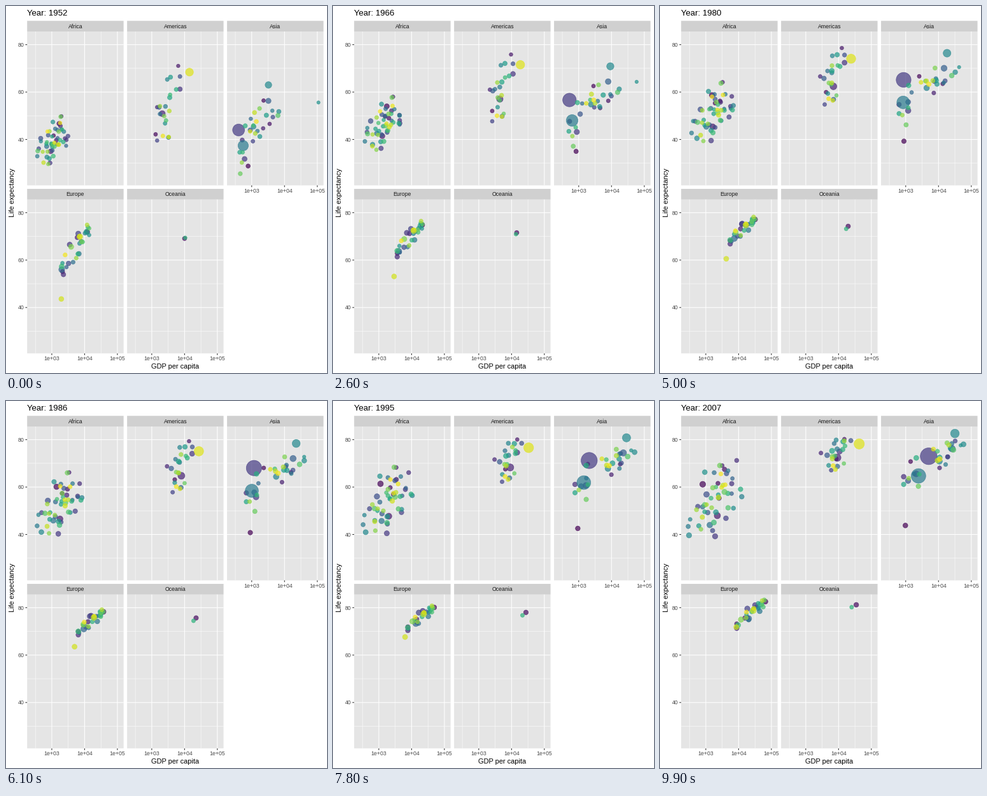
A matplotlib script for the animation above (10000 ms loop, 504 px wide and 576 px high).

```python
import numpy as np
import matplotlib
import matplotlib.pyplot as plt
from matplotlib.animation import FuncAnimation
from matplotlib.patches import Rectangle

W, H, FRAMES = 504, 576, 100
LEFT, RIGHT, GAP, STRIP_H = 33.2, 498.5, 5.5, 16.7
PANEL_W = (RIGHT - LEFT - 2 * GAP) / 3
PANEL_H = 241.5
X_MIN, X_MAX = 2.248, 5.189      # log10 of GDP per capita
Y_MIN, Y_MAX = 20.65, 85.55      # life expectancy
MAX_POP = 1318.7                 # millions
DRIFT = 0.8                      # how far dots change rank over the loop
TICK, AXIS_TEXT = "#333333", "#4d4d4d"

plt.rcParams["font.family"] = "Liberation Sans"
rng = np.random.default_rng(11)

# name: column, row, population growth
PANELS = {
    "Africa": (0, 0, 3.6),
    "Americas": (1, 0, 2.3),
    "Asia": (2, 0, 2.5),
    "Europe": (0, 1, 1.2),
    "Oceania": (1, 1, 2.2),
}

# Crowds: count, median population, correlation, then
# (mean x, sd x, mean y, sd y) at the start, middle and end
CROWDS = {
    "Africa": (52, 3, .5, (3.07, .27, 39.5, 5), (3.25, .36, 51, 6.5),
               (3.28, .43, 54.5, 9.3)),
    "Americas": (23, 4, .6, (3.48, .2, 53, 8.5), (3.8, .2, 65.5, 6.3),
                 (3.9, .25, 73.5, 4)),
    "Asia": (28, 7, .7, (3.2, .33, 46.5, 8.3), (3.65, .45, 62.5, 7),
             (3.85, .48, 71.5, 6)),
    "Europe": (29, 8, .85, (3.72, .22, 65, 4.6), (4.12, .2, 73, 2.4),
               (4.38, .23, 78, 2.7)),
}

# Landmarks: panel, shade, population, x and y at the start, middle and end
LANDMARKS = [
    ("Asia", 0, 8.4, (2.89, 2.945, 2.99), (28.8, 39.2, 43.8)),
    ("Asia", .17, 556, (2.6, 2.93, 3.7), (44, 65, 73)),
    ("Asia", .41, 372, (2.74, 2.92, 3.39), (37.4, 55.5, 64.7)),
    ("Asia", .47, 86, (3.51, 4.255, 4.5), (63, 76.3, 82.6)),
    ("Asia", .5, .2, (5.035, 4.63, 4.675), (55.6, 70.4, 77.6)),
    ("Americas", .1, 57, (3.32, 3.84, 3.96), (50.9, 62.3, 72.4)),
    ("Americas", .95, 157, (4.15, 4.38, 4.63), (68.4, 74, 78.2)),
    ("Europe", .93, 22, (3.29, 3.62, 3.93), (43.6, 60.4, 71.8)),
    ("Oceania", .035, 8.7, (4, 4.29, 4.54), (69.1, 74.2, 81.2)),
    ("Oceania", .645, 2, (4.02, 4.23, 4.4), (69.4, 73.1, 80.2)),
]


def bend(t, start, mid, end):
    """Quadratic that passes through three values at t = 0, 0.5 and 1."""
    start, mid, end = map(np.asarray, (start, mid, end))
    return start + (end - start) * t + (4 * mid - 2 * (start + end)) * t * (1 - t)


def origin(panel):
    col, row, _ = PANELS[panel]
    return LEFT + col * (PANEL_W + GAP), 40 + row * (PANEL_H + STRIP_H + GAP)


def to_px(panel, gx, gy):
    left, top = origin(panel)
    return (left + (gx - X_MIN) / (X_MAX - X_MIN) * PANEL_W,
            top + (Y_MAX - gy) / (Y_MAX - Y_MIN) * PANEL_H)


def diameter(pop):
    size = 2 + 10 * np.sqrt(np.minimum(pop / MAX_POP, 1))
    return .75 * (size * 2.845 + .94)


class Group:
    """Dots of one panel: shades, populations and a path (x, y) over time."""

    def __init__(self, panel, shades, pops, path):
        self.panel, self.path = panel, path
        self.shades, self.pops = np.atleast_1d(shades), np.atleast_1d(pops)

    def at(self, t):
        x, y = to_px(self.panel, *self.path(t))
        growth = PANELS[self.panel][2]
        d = diameter(self.pops * (1 + (growth - 1) * t))
        return np.column_stack([np.broadcast_to(x, d.shape),
                                np.broadcast_to(y, d.shape), d])


def landmark(panel, shade, pop, xs, ys):
    return Group(panel, shade, pop, lambda t: (bend(t, *xs), bend(t, *ys)))


def crowd(panel, count, median, corr, *stats):
    a0, a1, b0, b1 = rng.normal(size=(4, count))
    shades = (rng.permutation(count) + .5) / count
    pops = median * 10 ** np.clip(rng.normal(0, .4, count), -1, .9)

    def path(t):
        turn = DRIFT * t
        a, b = (np.clip(p * np.cos(turn) + q * np.sin(turn), -1.9, 1.9)
                for p, q in ((a0, a1), (b0, b1)))
        mx, sx, my, sy = bend(t, *stats)
        return mx + sx * a, my + sy * (corr * a + np.sqrt(1 - corr**2) * b)

    return Group(panel, shades, pops, path)


groups = [crowd(name, *spec) for name, spec in CROWDS.items()]
groups += [landmark(*spec) for spec in LANDMARKS]
shades = np.concatenate([g.shades for g in groups])
order = np.argsort(shades)

fig = plt.figure(figsize=(W / 72, H / 72), dpi=72, facecolor="white")
ax = fig.add_axes([0, 0, 1, 1])
ax.set(xlim=(0, W), ylim=(H, 0))
ax.axis("off")


def box(x, y, w, h, color):
    ax.add_patch(Rectangle((x, y), w, h, fc=color, lw=0, zorder=0, snap=False))


def line(xs, ys, color="white", lw=1.07):
    ax.plot(xs, ys, color=color, lw=lw, zorder=1, solid_capstyle="butt", snap=False)


def label(x, y, text, size, color="black", ha="center", **kw):
    kw.setdefault("va", "baseline")
    return ax.text(x, y, text, fontsize=size, color=color, ha=ha, zorder=5, **kw)


def draw_panel(name):
    left, top = origin(name)
    right, bottom = left + PANEL_W, top + PANEL_H
    box(left, top, PANEL_W, PANEL_H, "#e5e5e5")
    box(left, top - STRIP_H, PANEL_W, STRIP_H, "#d0d0d0")
    label(left + PANEL_W / 2, top - 5.2, name, 8.8, "#1a1a1a")
    for gx in np.arange(2.5, 5.1, .5):
        major = gx % 1 == 0
        x = to_px(name, gx, 0)[0]
        line([x, x], [top, bottom], lw=1.07 if major else .53)
        if major and name in ("Asia", "Europe", "Oceania"):
            line([x, x], [bottom, bottom + 2.75], TICK)
            label(x, bottom + 11.3, f"1e+0{gx:.0f}", 8.8, AXIS_TEXT)
    for gy in range(30, 81, 10):
        major = gy % 20 == 0
        y = to_px(name, 0, gy)[1]
        line([left, right], [y, y], lw=1.07 if major else .53)
        if major and left == LEFT:
            line([left - 2.75, left], [y, y], TICK)
            label(left - 5, y + 3.2, str(gy), 8.8, AXIS_TEXT, "right")


for name in PANELS:
    draw_panel(name)
label((LEFT + RIGHT) / 2, 569, "GDP per capita", 11)
label(10.3, 292.7, "Life expectancy", 11, rotation=90, va="center")
title = label(LEFT, 15, "", 13.2, ha="left")

colors = matplotlib.colormaps["viridis"](shades[order])
colors[:, 3] = .7
dots = ax.scatter(shades, shades, c=colors, edgecolors=colors, linewidths=.7, zorder=3)


def update(i):
    t = i / (FRAMES - 1)
    now = np.concatenate([g.at(t) for g in groups])[order]
    dots.set_offsets(now[:, :2])
    dots.set_sizes(now[:, 2] ** 2)
    title.set_text(f"Year: {round(1952 + 55 * t)}")
    return dots, title


anim = FuncAnimation(fig, update, frames=FRAMES, interval=100, repeat=True,
                     repeat_delay=0, init_func=lambda: update(0))
plt.show()
```
